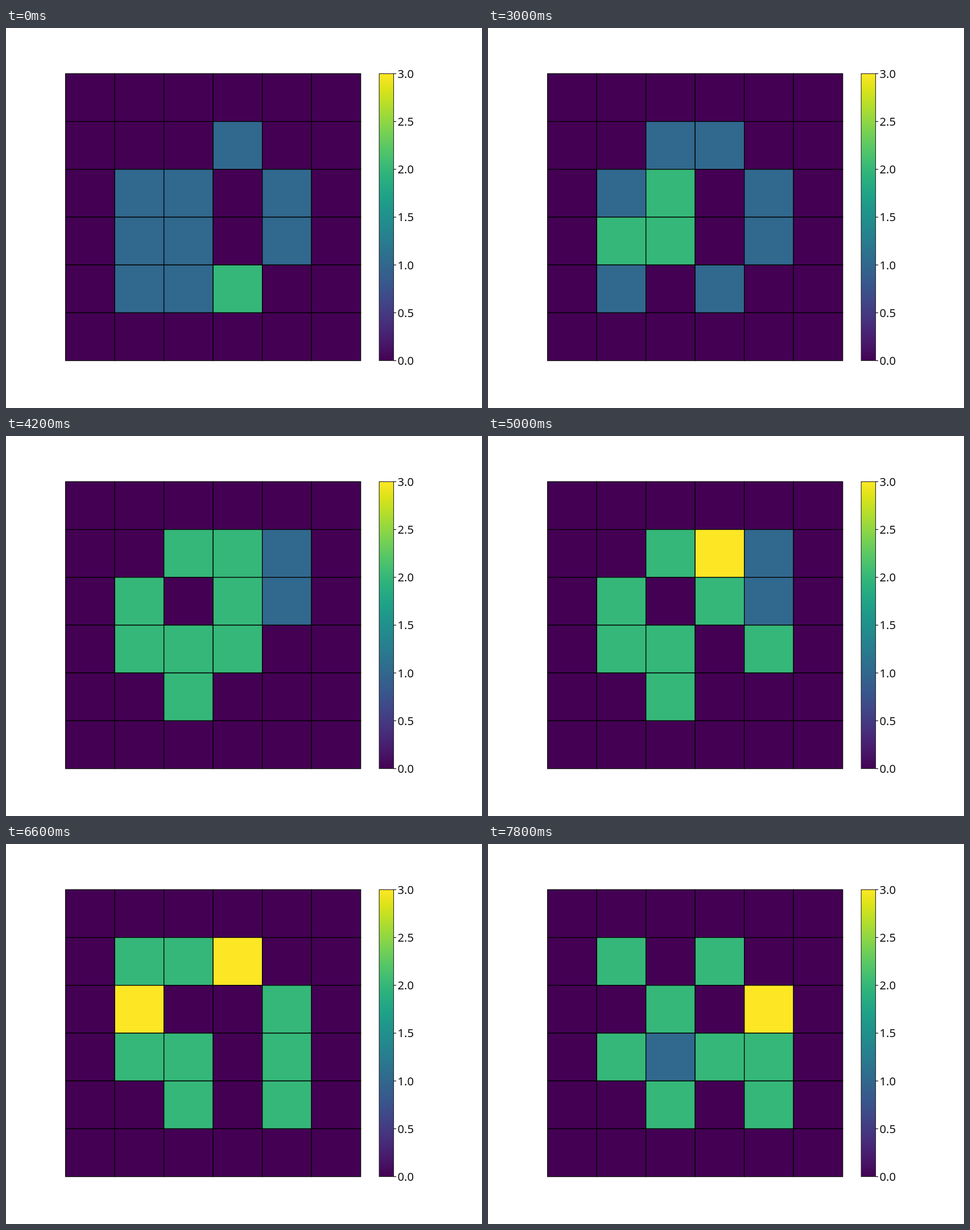
An HTML page that plays this animation: 837x669 px, repeating every 8000 ms.

```html
<!DOCTYPE html>
<html lang="en">
<head>
<meta charset="utf-8">
<title>Lattice epidemic</title>
<style>
  html, body { margin: 0; width: 100%; height: 100%; overflow: hidden; background: #fff; }
  svg { display: block; width: 100%; height: 100%; }
  text { font: 20.4px "Noto Sans", "Open Sans", sans-serif; fill: #111; }
</style>
</head>
<body>
<svg id="stage" viewBox="0 0 837 669"></svg>
<script>
const LOOP = 8000, SIZE = 6;
const LEFT = 104.7, TOP = 80.4, RIGHT = 623.7, BOTTOM = 585.6;
const CW = (RIGHT - LEFT) / SIZE, CH = (BOTTOM - TOP) / SIZE;

// empty, susceptible, infected, recovered
const STATES = ["#440154", "#31688e", "#35b779", "#fde725"];
const VIRIDIS = ["#440154", "#481567", "#482677", "#453781", "#404788",
  "#39568c", "#33638d", "#2d708e", "#287d8e", "#238a8d", "#1f968b", "#20a387",
  "#29af7f", "#3cbb75", "#55c667", "#73d055", "#95d840", "#b8de29", "#dce319",
  "#fde725"];

const START = "000000" + "000100" + "011010" + "011010" + "011200" + "000000";

// "ab-cd" moves an agent between row/column cells, "ab=s" sets its state
const EVENTS = [
  [200, "24-14 34-24"],
  [600, "32-33 33-34 43-32"],
  [1200, "42-43"],
  [1400, "43-44"],
  [2200, "44-43"],
  [2600, "13-12 14-13 31=2"],
  [3000, "22=2"],
  [3400, "41-42 21=2"],
  [3600, "24-14 34-24 42=2 12=2"],
  [3800, "22-23 13=2"],
  [4200, "43-33 33=2"],
  [4400, "33-34"],
  [4600, "13=3"],
  [4800, "34-44"],
  [5000, "44-34"],
  [5400, "21=3"],
  [5800, "12-11 23-12"],
  [6200, "24=2"],
  [6400, "34-44 24-34 14-24"],
  [6600, "24=2"],
  [7000, "24=3"],
  [7200, "32-33 21-32"],
  [7400, "12-22"],
  [7600, "32=1 13=1"],
  [7800, "13=2"]
];

const svg = document.getElementById("stage");

function add(tag, attrs, parent = svg) {
  const el = document.createElementNS("http://www.w3.org/2000/svg", tag);
  for (const key in attrs) el.setAttribute(key, attrs[key]);
  return parent.appendChild(el);
}

const cells = [...START].map((_, i) => add("rect", {
  x: LEFT + (i % SIZE) * CW, y: TOP + Math.floor(i / SIZE) * CH,
  width: CW, height: CH, stroke: "#000", "stroke-width": 1.3
}));

function drawBar() {
  const ramp = add("linearGradient", { id: "ramp", x1: 0, y1: 1, x2: 0, y2: 0 });
  VIRIDIS.forEach((c, i) => add("stop", {
    offset: i / (VIRIDIS.length - 1), "stop-color": c
  }, ramp));
  add("rect", {
    x: 656.2, y: TOP, width: 25.4, height: BOTTOM - TOP,
    fill: "url(#ramp)", stroke: "#111", "stroke-width": 1
  });
  for (let i = 0; i <= 6; i++) {
    const y = BOTTOM - (BOTTOM - TOP) * i / 6;
    add("path", { d: `M681.6 ${y}h4.6`, stroke: "#111", "stroke-width": 1.2 });
    add("text", { x: 688.4, y: y + 7.4 }).textContent = (i / 2).toFixed(1);
  }
}

const index = (row, col) => row * SIZE + +col;

function apply(grid, step) {
  const at = index(step[0], step[1]);
  if (step[2] === "=") {
    grid[at] = +step[3];
  } else {
    grid[index(step[3], step[4])] = grid[at];
    grid[at] = 0;
  }
}

function render(t) {
  const grid = [...START].map(Number);
  for (const [time, steps] of EVENTS) {
    if (time > t) break;
    steps.split(" ").forEach(step => apply(grid, step));
  }
  grid.forEach((s, i) => cells[i].setAttribute("fill", STATES[s]));
}

drawBar();
render(0);
const begin = performance.now();
function tick() {
  render((performance.now() - begin) % LOOP);
  requestAnimationFrame(tick);
}
requestAnimationFrame(tick);
</script>
</body>
</html>
```
